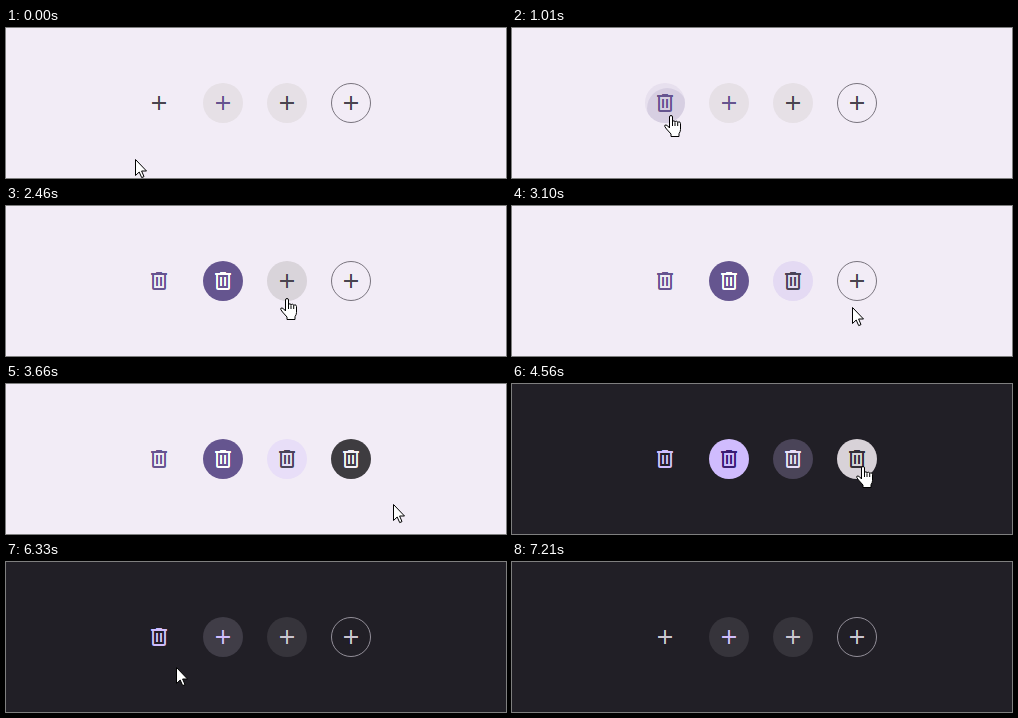
These frames come from a looping animation (500x150 px, 7790 ms). An HTML page with a canvas:

```html
<!DOCTYPE html>
<html lang="en">
<head>
<meta charset="utf-8">
<title>Icon toggle buttons</title>
<style>
  html, body { margin: 0; width: 100%; height: 100%; overflow: hidden; }
  canvas { display: block; }
</style>
</head>
<body>
<canvas id="stage" width="500" height="150"></canvas>
<script>
const ctx = document.getElementById('stage').getContext('2d');
const LOOP = 7790, DARK_AT = 3810, CURSOR_GONE = 7200;
const RADIUS = 20, CENTER_Y = 75;

const plus = new Path2D('M11 19v-6H5v-2h6V5h2v6h6v2h-6v6z');
const trash = new Path2D('M7 21c-1.1 0-2-.9-2-2V6H4V4h5V3h6v1h5v2h-1v13c0 1.1-.9 2-2 2zM17 6H7v13h10zM9 8h2v9H9zM13 8h2v9h-2z');
const arrow = new Path2D('M.5 .5V16.5L4.2 13 6.7 18.6 9 17.6 6.6 12H11.5z');
const hand = new Path2D('M5.5 13V2q0-1.5 1.5-1.5T8.5 2v5q0-1.2 1.3-1.2T11 7.2q.2-1 1.4-1t1.3 1.5q.3-.9 1.4-.9t1.4 1.7v6q0 2-1.5 4.2v2.8h-8v-2.5L2.5 14Q0 11 .8 10.3q1-1 3 .7l1.7 2z');
const knuckles = new Path2D('M8.5 7v4M11 7.5v3.5M13.7 8v3');

// Each style is [container, icon, outline]
const themes = {
  light: {
    surface: '#f2ecf6',
    off: [[null, '#49454f'], ['#e6e0e6', '#65558f'], ['#e6e0e6', '#49454f'], [null, '#49454f', '#79747e']],
    on: [[null, '#65558f'], ['#65558f', '#ffffff'], ['#e8def8', '#4a4458'], ['#313033', '#f5eff7']]
  },
  dark: {
    surface: '#211f26',
    off: [[null, '#cac4d0'], ['#36343b', '#d0bcfe'], ['#36343b', '#cac4d0'], [null, '#cac4d0', '#938f99']],
    on: [[null, '#d0bcfe'], ['#d0bcfe', '#381e72'], ['#4a4458', '#e8def8'], ['#e6e0e6', '#322f35']]
  }
};

const buttons = [
  { x: 153, onAt: 1010, offAt: 6620 },
  { x: 217, onAt: 1970, offAt: 6040 },
  { x: 281, onAt: 2700, offAt: 5440 },
  { x: 345, onAt: 3370, offAt: 4860 }
];

// Pointer moves: start, end, x, y, downward bow
const moves = [
  [0, 0, 129, 131, 0],
  [270, 840, 158, 87, 0],
  [1190, 1770, 211, 88, 24],
  [1970, 2530, 283, 91, 22],
  [2700, 3250, 352, 90, 37],
  [3390, 3840, 406, 136, 0],
  [3840, 4520, 350, 82, 15],
  [4870, 5300, 296, 88, 26],
  [5470, 5870, 223, 88, 34],
  [6050, 6470, 152, 86, 45],
  [6630, 6790, 176, 138, 0],
  [6940, 7210, 356, 151, 0]
];

const clamp = v => Math.min(1, Math.max(0, v));
const ease = u => u * u * (3 - 2 * u);

function pointerAt(t) {
  let x = 0, y = 0;
  for (const [start, end, toX, toY, bow] of moves) {
    if (t < start) break;
    const p = end > start ? ease(clamp((t - start) / (end - start))) : 1;
    x += (toX - x) * p;
    y += (toY - y) * p + bow * Math.sin(Math.PI * Math.sqrt(p));
  }
  return { x: Math.round(x), y: Math.round(y) };
}

const isOver = (b, p) => Math.hypot(p.x - b.x, p.y - CENTER_Y) <= RADIUS;

function disc(x, y, r, color, alpha = 1) {
  ctx.globalAlpha = alpha;
  ctx.fillStyle = color;
  ctx.beginPath();
  ctx.arc(x, y, r, 0, 7);
  ctx.fill();
  ctx.globalAlpha = 1;
}

// Subpixel antialiasing: each colour channel is shifted by a third of a pixel
function drawIcon(path, x, y, color) {
  const value = parseInt(color.slice(1), 16);
  ['#00ffff', '#ff00ff', '#ffff00'].forEach((mask, i) => {
    const shift = 16 - 8 * i;
    const channel = value & (255 << shift);
    ctx.save();
    ctx.translate(x + (1 - i) / 3, y);
    ctx.globalCompositeOperation = 'multiply';
    ctx.fillStyle = mask;
    ctx.fill(path, 'evenodd');
    ctx.globalCompositeOperation = 'lighter';
    ctx.fillStyle = '#' + channel.toString(16).padStart(6, '0');
    ctx.fill(path, 'evenodd');
    ctx.restore();
  });
}

function drawRipple(b, t, clickAt, color) {
  const age = t - (clickAt - 110);
  if (age < 0 || age > 600) return;
  const p = pointerAt(clickAt);
  const grow = 1 - Math.pow(1 - clamp(age / 450), 3);
  const x = p.x + (b.x - p.x) * grow, y = p.y + (CENTER_Y - p.y) * grow;
  ctx.save();
  ctx.beginPath();
  ctx.arc(b.x, CENTER_Y, RADIUS, 0, 7);
  ctx.clip();
  disc(x, y, 4 + 28 * grow, color, 0.12 * (1 - clamp((age - 225) / 375)));
  ctx.restore();
}

function drawButton(b, i, t, theme, pointer) {
  const on = t >= b.onAt && t < b.offAt;
  const [container, icon, outline] = theme[on ? 'on' : 'off'][i];
  if (container) disc(b.x, CENTER_Y, RADIUS, container);
  if (isOver(b, pointer)) disc(b.x, CENTER_Y, RADIUS, icon, 0.08);
  drawRipple(b, t, t < DARK_AT ? b.onAt : b.offAt, icon);
  if (outline) {
    ctx.strokeStyle = outline;
    ctx.beginPath();
    ctx.arc(b.x, CENTER_Y, RADIUS - 0.5, 0, 7);
    ctx.stroke();
  }
  drawIcon(on ? trash : plus, b.x - 12, CENTER_Y - 12, icon);
}

function drawPointer(p) {
  const pointing = buttons.some(b => isOver(b, p));
  const shape = pointing ? hand : arrow;
  ctx.save();
  ctx.translate(p.x - (pointing ? 6 : 0), p.y);
  ctx.fillStyle = '#fff';
  ctx.strokeStyle = '#000';
  ctx.fill(shape);
  ctx.stroke(shape);
  if (pointing) ctx.stroke(knuckles);
  ctx.restore();
}

function render() {
  const t = performance.now() % LOOP;
  const theme = t < DARK_AT ? themes.light : themes.dark;
  const pointer = pointerAt(t);
  ctx.fillStyle = theme.surface;
  ctx.fillRect(0, 0, 500, 150);
  buttons.forEach((b, i) => drawButton(b, i, t, theme, pointer));
  if (t < CURSOR_GONE) drawPointer(pointer);
  requestAnimationFrame(render);
}
render();
</script>
</body>
</html>
```
